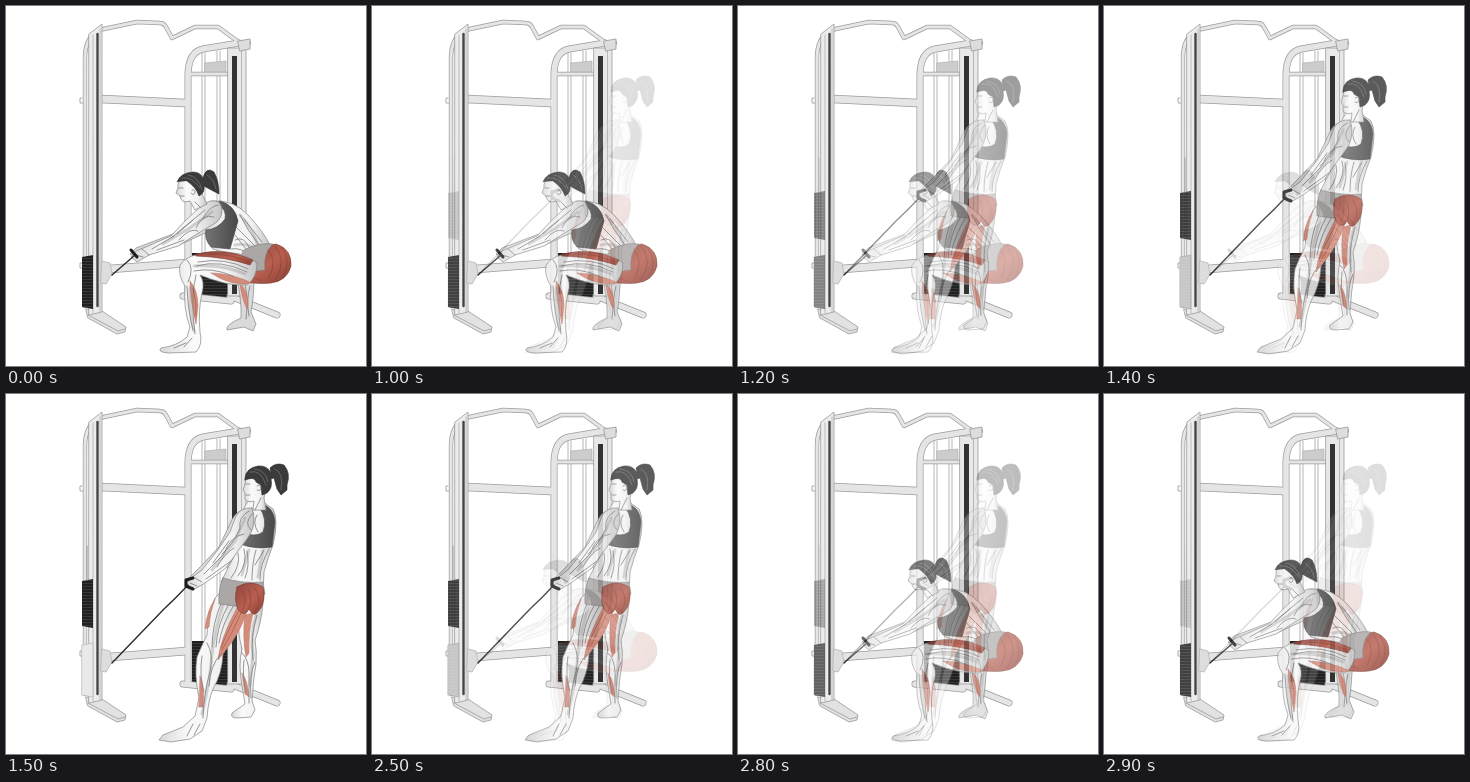
An HTML page that plays this animation: 360x360 px, repeating every 3000 ms.

```html
<!DOCTYPE html>
<html lang="en">
<head>
<meta charset="utf-8">
<title>Cable squat</title>
<style>
  html, body { margin: 0; width: 100%; height: 100%; overflow: hidden; background: #fff; }
  svg { display: block; width: 100vw; height: 100vh; }
  path { stroke-linejoin: round; stroke-linecap: round; }
  .skin { fill: url(#skin); stroke: #858585; stroke-width: .7; }
  .far { fill: #dadada; stroke: #858585; stroke-width: .7; }
  .cloth { fill: url(#cloth); stroke: #444; stroke-width: .6; }
  .shorts { fill: #aaa7a6; stroke: #7d7977; stroke-width: .6; }
  .red { fill: url(#red); stroke: #793d34; stroke-width: .6; }
  .tint { fill: #d58b7a; stroke: #a7685b; stroke-width: .4; }
  .hair { fill: #3b3b3b; stroke: #292929; stroke-width: .6; }
  .shine { fill: none; stroke: #777; stroke-width: .7; }
  .line { fill: none; stroke: #7d7d7d; stroke-width: .8; }
  .shade { fill: none; stroke: #858585; stroke-opacity: .34; stroke-width: 3; }
  .fibre { fill: none; stroke: #6f3028; stroke-opacity: .55; stroke-width: .7; }
  .cord { fill: none; stroke: #2b2b2b; stroke-width: 1.4; }
  .grip { fill: none; stroke: #1c1c1c; stroke-width: 3; }
  #rise { opacity: 0; animation: fade 3s step-end infinite; }
  @keyframes fade {
    0% { opacity: 0; }
    33.33% { opacity: .167; }
    36.66% { opacity: .333; }
    40% { opacity: .5; }
    43.33% { opacity: .667; }
    46.66% { opacity: .833; }
    50% { opacity: 1; }
    83.33% { opacity: .833; }
    86.66% { opacity: .667; }
    90% { opacity: .5; }
    93.33% { opacity: .333; }
    96.66% { opacity: .167; }
    100% { opacity: 0; }
  }
</style>
</head>
<body>
<svg viewBox="0 0 360 360">
  <defs>
    <linearGradient id="skin">
      <stop offset="0" stop-color="#d8d8d8"/><stop offset=".35" stop-color="#fafafa"/>
      <stop offset=".7" stop-color="#f2f2f2"/><stop offset="1" stop-color="#c4c4c4"/>
    </linearGradient>
    <linearGradient id="cloth">
      <stop offset="0" stop-color="#747474"/><stop offset="1" stop-color="#484848"/>
    </linearGradient>
    <linearGradient id="red" x2="1" y2="1">
      <stop offset="0" stop-color="#8f443a"/><stop offset=".55" stop-color="#b96051"/><stop offset="1" stop-color="#8a3f35"/>
    </linearGradient>
    <pattern id="plates" width="20" height="3" patternUnits="userSpaceOnUse">
      <path d="M0 0H20V3H0Z" fill="#202020"/><path d="M0 .5H20" stroke="#484848" stroke-width=".6"/>
    </pattern>

    <path id="thin" d="M93 24 131 16 154 17Q158 17 160 21L166 32 189 21 212 21 234 37 243 37M79 300V52Q79 32 92 25M183 68H223"/>
    <path id="beams" d="M95 93 179 97M104 263 181 257"/>
    <path id="posts" d="M182 289V70Q182 46 197 43L233 37"/>
    <path id="feet" d="M177 290 225 295M224 290 271 309"/>

    <g id="machine" fill="none">
      <path d="M0 0H360V360H0Z" fill="#fff"/>
      <path d="M196 47V250M199 47V250M211 45V250M214 45V250" stroke="#a2a2a2" stroke-width=".8"/>
      <path d="M199 57 220 55V67H199Z" fill="#ccc" stroke="#aaa" stroke-width=".6"/>
      <path d="M186 247H222V293H186Z" fill="url(#plates)"/>
      <g stroke="#9b9b9b">
        <use href="#posts" stroke-width="7"/><use href="#beams" stroke-width="8.600"/>
        <use href="#feet" stroke-width="7"/><use href="#thin" stroke-width="4.400"/>
      </g>
      <g stroke="#e5e5e5">
        <use href="#posts" stroke-width="5.600"/><use href="#beams" stroke-width="7.200"/>
        <use href="#feet" stroke-width="5.600"/><use href="#thin" stroke-width="3"/>
      </g>
      <path d="M222 42H240V290H222Z" fill="#e8e8e8" stroke="#9b9b9b" stroke-width=".8"/>
      <path d="M226 50H231V288H226Z" fill="#333"/>
      <path d="M235.500 45V289" stroke="#aaa" stroke-width=".8"/>
      <path d="M232 35 244 33V43L234 45Z" fill="#ddd" stroke="#999" stroke-width=".8"/>
      <path d="M80 303 96 305 120 321 119 326 111 328 82 312Z" fill="#e2e2e2" stroke="#999" stroke-width=".8"/>
      <path d="M82 309 112 325 119 323M76 92H74V97H77M76 257H74V262H77" stroke="#aaa"/>
      <path d="M83 28 96 18V306L83 309Z" fill="#ececec" stroke="#9b9b9b" stroke-width=".8"/>
      <path d="M91.500 28V300" stroke="#444" stroke-width="2.400" stroke-dasharray="2 .5" stroke-linecap="butt"/>
      <path d="M87 29V307M94 23V306" stroke="#b0b0b0" stroke-width=".8"/>
      <path d="M96 255 104 257 106 268 100 278 95 277Z" fill="#ddd" stroke="#b5b5b5" stroke-width=".8"/>
    </g>
  </defs>

  <g id="squat">
    <use href="#machine"/>
    <path d="M76 251 87 249V303L76 301Z" fill="url(#plates)"/>
    <path class="far" d="M230 268 248 268Q248 292 245 306L250 318 247 325 238 321 221 324Q219 319 235 312 236 294 230 268Z"/>
    <path class="line" d="M238 275Q243 291 240 313M244 280Q240 293 243 310"/>
    <path class="tint" d="M234 278Q241 283 242 297L241 303Q235 291 234 278Z"/>
    <path class="far" d="M204 207Q180 214 167 228L130 242 124 248 131 252 173 239 210 222Z"/>

    <path class="skin" d="M205 195Q227 193 242 209 258 226 265 241L250 262Q233 259 225 248L207 243Q197 230 200 208Z"/>
    <path class="cloth" d="M214 195Q229 199 232 215L224 243 205 241Q198 233 200 224 212 223 219 213 221 204 212 198Z"/>
    <path class="shade" d="M234 209Q245 221 251 237M229 239Q242 236 252 245"/>
    <path class="line" d="M234 209Q241 224 253 239M228 228 240 243M230 221 249 240M225 243Q235 241 243 249M229 234Q238 229 244 243M238 213 256 236"/>

    <path class="red" d="M236 260Q247 241 270 238 286 243 285 260 281 275 265 277 246 279 231 273Z"/>
    <path class="shorts" d="M238 244Q252 236 267 238 257 247 259 264L242 266 231 257Z"/>
    <path class="fibre" d="M262 244Q272 254 263 272M269 240Q282 255 269 274M276 242Q286 255 277 271M237 267 255 275"/>

    <path class="skin" d="M251 257Q236 244 207 246 180 248 174 259 172 270 179 280 177 302 184 321L181 331Q171 340 155 342 151 346 162 347L190 346Q197 339 194 326 192 304 196 287 199 276 194 269 220 280 241 279 251 272 251 257Z"/>
    <path class="red" d="M190 248Q219 241 247 254L244 259Q220 251 190 250Z"/>
    <path class="tint" d="M184 275Q192 284 192 300L190 318Q184 295 184 275ZM205 267Q225 267 246 277 225 281 205 267Z"/>
    <path class="shade" d="M188 260Q217 258 239 268M184 282Q183 304 188 325"/>
    <path class="line" d="M181 254Q189 262 182 276M190 260Q215 253 241 266M192 256Q219 251 242 263M188 265Q206 261 227 270M190 269Q184 292 189 328M181 280Q182 306 187 324M178 341 186 332M168 342 180 337"/>
    <path class="fibre" d="M203 248Q227 248 243 256M187 282Q191 297 190 310"/>

    <path class="skin" d="M213 196Q203 192 194 201L178 216 165 230 142 240 130 245 125 251 131 256 143 249 172 240 191 228 211 216Q220 206 213 196Z"/>
    <path class="shade" d="M206 206 184 222 157 238"/>
    <path class="line" d="M212 199Q202 201 197 213M199 204 177 222 165 232M208 211Q196 207 190 222M192 225Q184 221 173 234M187 214 171 228M168 230 146 243M178 234 151 244M136 243 143 249M130 249 137 251"/>

    <path class="skin" d="M177 170Q171 176 172 182L170 187 174 190Q175 198 184 195L189 204 201 198 195 186Q193 173 177 170Z"/>
    <path class="hair" d="M171 176Q174 167 187 166 194 166 197 172 200 160 208 166 213 175 213 188 205 184 198 180 199 187 193 190 190 181 181 175 171 180Z"/>
    <path class="shine" d="M176 172Q186 170 194 182M182 169Q192 170 196 183M201 169Q208 173 210 183"/>
    <path class="line" d="M173 182 177 182M174 190 178 190M186 184Q189 183 189 187 187 190 185 187M189 196 195 202"/>
    <path class="cord" d="M106 269 129 249"/>
    <path class="grip" d="M125 244 131 251"/>
  </g>

  <g id="rise">
    <use href="#machine"/>
    <path d="M76 251 87 249V303L76 301Z" fill="#e9e9e9" stroke="#b5b5b5" stroke-width=".7"/>
    <path d="M76 187 87 185V234L76 232Z" fill="url(#plates)"/>
    <path d="M81 152V186" stroke="#999"/>
    <path class="skin" d="M233 207Q230 235 236 255 232 271 236 291L239 310 226 319Q224 324 231 324L245 323 249 316 246 307Q247 286 250 270 251 257 249 246 255 230 257 210Z"/>
    <path class="tint" d="M239 221 247 219Q242 239 243 259L240 263Q236 242 239 221ZM236 279Q242 287 243 303L239 300Z"/>
    <path class="shade" d="M250 222Q244 242 247 260L244 291"/>
    <path class="line" d="M251 221Q244 243 247 266M236 259Q243 266 243 279L243 309M249 268Q243 280 245 304M238 266Q236 280 240 299"/>

    <path class="skin" d="M218 195 209 204Q202 220 201 241 195 253 191 263 188 281 193 304L189 322 177 333 157 341 153 346 165 348 184 345 196 337 201 324Q202 307 207 295 216 280 217 260 232 239 240 214L239 194Z"/>
    <path class="tint" d="M209 205Q204 218 203 233L199 235Q201 216 209 205ZM194 282Q199 293 197 313L193 313Z"/>
    <path class="tint" d="M231 214 241 217Q234 240 219 257L212 266Q214 245 231 214Z"/>
    <path class="shade" d="M218 207Q209 235 206 260 204 287 196 320"/>
    <path class="line" d="M216 207Q206 230 206 253M223 210Q211 230 210 253M228 211Q216 230 213 249M201 249Q208 260 204 278 198 298 197 324M215 260Q204 271 203 292M196 262Q193 281 198 298M187 330 181 342M194 330 188 341"/>
    <path class="fibre" d="M235 219Q226 240 216 256M232 218Q221 238 215 254"/>

    <path class="far" d="M237 116Q228 118 223 132L213 153 195 172 182 185 186 191 200 182 221 163 236 142Z"/>
    <path class="skin" d="M243 106Q235 116 233 132 233 148 228 162L215 188 254 200Q259 188 258 178 262 163 267 151 273 126 267 115L256 107Z"/>
    <path class="shorts" d="M217 184Q238 190 257 188L259 200Q244 199 237 213L213 210Q212 196 217 184Z"/>
    <path class="red" d="M231 193Q244 185 257 193 261 209 251 219 247 223 243 215 239 223 233 217 227 207 231 193Z"/>
    <path class="fibre" d="M243 215Q247 204 242 195M236 197Q243 205 236 217M249 194Q257 207 249 218"/>
    <path class="shade" d="M243 156Q239 169 236 181M257 157Q254 169 252 183"/>
    <path class="line" d="M250 156Q246 169 246 186M238 155Q242 169 232 182M258 156 249 171M263 155Q254 170 254 186M232 159Q235 171 225 184M241 157Q244 172 239 184"/>
    <path class="cloth" d="M254 109Q268 113 269 128L266 153Q248 156 232 149L235 138Q249 144 257 138 262 125 253 113Z"/>

    <path class="skin" d="M246 114Q235 113 230 122L224 138 211 157 196 176 185 184 180 190 187 196 199 189 220 174 232 157 241 145Q252 131 246 114Z"/>
    <path class="shade" d="M239 124 229 147 206 176"/>
    <path class="line" d="M243 117Q232 123 234 135 226 151 216 160M247 119Q237 129 245 136M251 121Q246 129 252 138M238 140Q224 142 218 160L198 180M228 154Q218 160 211 173M223 147 207 169M225 167 200 185M189 184 196 188M184 189 191 192"/>

    <path class="skin" d="M240 82 239 90 237 96 239 99 239 105Q242 109 248 107L247 116 260 116 258 104 261 91 252 79Z"/>
    <path class="hair" d="M239 84Q240 74 252 72 261 71 265 79L264 74Q270 68 278 71 285 79 281 91L281 96 275 101 271 95 268 84 265 85Q267 94 261 99L256 101 255 91 250 88Q249 82 239 86Z"/>
    <path class="shine" d="M244 78Q255 75 260 91M248 75Q260 76 262 88M269 75Q278 79 275 96"/>
    <path class="line" d="M240 90 244 90M240 101 244 101M251 92Q255 89 255 95 253 98 251 96M255 104 249 116"/>
    <path class="cord" d="M106 269 158 215Q170 204 182 191"/>
    <path class="grip" d="M187 184 180 186 180 192 187 195"/>
  </g>
</svg>
</body>
</html>
```
